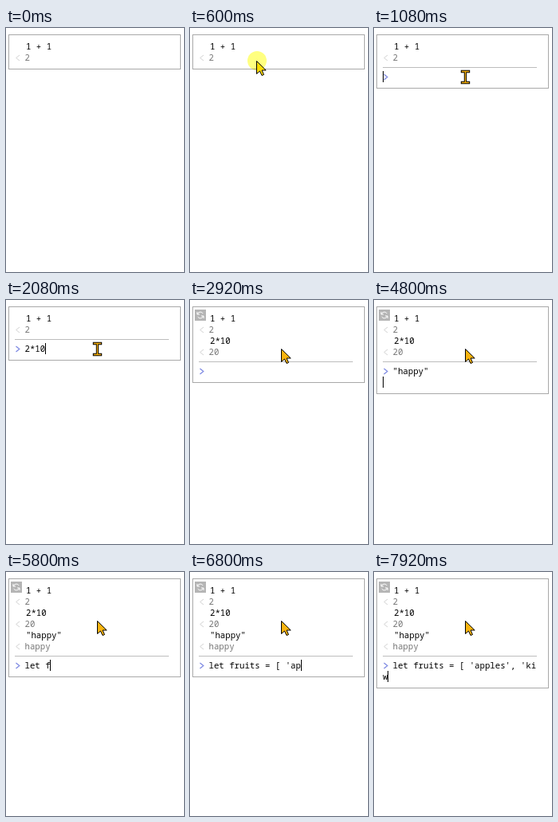
An HTML page that plays this animation: 223 px wide and 306 px high, repeating every 8 s.

```html
<!DOCTYPE html>
<html lang="en">
<head>
<meta charset="utf-8">
<title>Console session</title>
<style>
  html, body { margin: 0; height: 100%; overflow: hidden; background: #fff; }
  svg { display: block; }
  text { font: 10.7px "Noto Sans Mono", "DejaVu Sans Mono", monospace; white-space: pre; }
</style>
</head>
<body>
<svg id="stage" width="223" height="306" viewBox="0 0 223 306"></svg>
<script>
const stage = document.getElementById('stage');
const LOOP = 8000, ROW = 14, CHAR = 6.43, WRAP = 28;

// [time shown, input, output]
const history = [[0, '1 + 1', '2'], [2320, '2*10', '20'], [4960, '"happy"', 'happy']];

// Each prompt: open and close times, then its key presses
const prompts = [
  { from: 680, to: 2320, keys: [[1440, '2'], [1760, '*'], [2000, '1'], [2080, '0'], [2240, '\n']] },
  { from: 2480, to: 4960, keys: [[3160, '"'], [3480, 'h'], [3560, 'a'], [3640, 'p'], [3800, 'p'],
    [3920, 'y'], [4560, '"'], [4800, '\n']] },
  { from: 5040, to: LOOP, keys: [[5320, 'l'], [5400, 'e'], [5480, 't'], [5640, ' '], [5800, 'f'],
    [5880, 'r'], [5920, 'u'], [5960, 'i'], [6040, 't'], [6200, 's'], [6280, ' ='], [6440, ' ['],
    [6520, ' '], [6600, "'"], [6720, 'a'], [6800, 'p'], [6960, 'p'], [7040, 'l'], [7200, 'es'],
    [7360, "'"], [7440, ','], [7600, ' '], [7760, "'k"], [7840, 'i'], [7920, 'w']] }
];
const caretOff = [[1320, 1440], [2920, 3160], [4480, 4560]];

const within = (t, a, b) => t >= a && t < b;
const text = (x, top, s, color = '#000') => `<text x="${x}" y="${top + 11}" fill="${color}">${s}</text>`;
const rect = (x, y, w, h, color) => `<rect x="${x}" y="${y}" width="${w}" height="${h}" fill="${color}"/>`;
const line = (d, color, width = 1) =>
  `<path d="${d}" fill="none" stroke="${color}" stroke-width="${width}"/>`;

function promptView(t, prompt, top) {
  const typed = prompt.keys.filter(k => k[0] <= t).map(k => k[1]).join('');
  const lines = typed.split('\n').flatMap(s => s.match(new RegExp(`.{1,${WRAP}}`, 'g')) || ['']);
  const last = lines.length - 1;
  const left = i => i ? 11 : 23.5;
  let out = rect(11, top - 5, 193, 1, '#bdbdbd')
    + line(`M12.5 ${top + 4}l4.3 3.5l-4.3 3.5`, '#7b86e2', 1.2);
  lines.forEach((s, i) => out += text(left(i), top + i * ROW, s));
  if (!caretOff.some(([a, b]) => within(t, a, b))) {
    const x = typed ? Math.floor(left(last) + lines[last].length * CHAR) : 11;
    out += rect(x, top + last * ROW, 1, ROW, '#000');
  }
  return [out, top + lines.length * ROW];
}

function resetIcon() {
  return rect(6, 12, 14, 14, '#b5b5b5')
    + line('M9.3 18a3.8 3.8 0 0 1 7-1M16.7 20a3.8 3.8 0 0 1-7 1M9 15v3h3M17 23v-3h-3', '#fff');
}

function pointer(t) {
  if (t < 80) return '';
  const steps = (start, gap, n) => Math.max(0, Math.min(1, (Math.floor((t - start) / gap)) / n));
  const k = 1 - (1 - steps(80, 72, 5)) ** 2;
  const m = steps(840, 80, 3);
  const x = Math.floor(152 - 69 * k + 31 * m), y = Math.floor(237 - 196 * k + 20 * m);
  if (within(t, 1080, 2320)) {
    const beam = 'M-4 -7h8M0 -7v14M-4 7h8';
    return `<g transform="translate(${x + .5} ${y + .5})" stroke-linecap="square">`
      + line(beam, '#000', 3.4) + line(beam, '#f5b000', 1.4) + '</g>';
  }
  const click = within(t, 600, 680);
  const glow = click
    ? `<circle cx="${x + 1}" cy="${y}" r="12" fill="#ffff80" style="mix-blend-mode:multiply"/>` : '';
  return glow + `<path transform="translate(${x + .5} ${y + .5})" stroke="#000"
    fill="${click ? '#ffdc00' : '#f9b410'}" d="M0 0V16L4 12.5L6.5 18L9 17L6.6 11.5H11.7Z"/>`;
}

function scene(t) {
  let y = 16, out = '';
  for (const [time, input, output] of history) {
    if (t < time) break;
    out += text(25, y, input) + text(23.5, y + ROW, output, '#777')
      + line(`M17 ${y + ROW + 4}l-4.3 3.5l4.3 3.5`, '#d2d2d2');
    y += 2 * ROW;
  }
  const prompt = prompts.find(p => within(t, p.from, p.to));
  if (prompt) {
    const [view, end] = promptView(t, prompt, y + 10);
    out += view;
    y = end;
  }
  if (t >= 2480) out += resetIcon();
  return `<rect x="3.5" y="8.5" width="215" height="${y - 1}" fill="none" stroke="#a9a9a9"/>`
    + out + pointer(t);
}

let shown;
function draw() {
  const next = scene(performance.now() % LOOP);
  if (next !== shown) stage.innerHTML = shown = next;
  requestAnimationFrame(draw);
}
draw();
</script>
</body>
</html>
```
